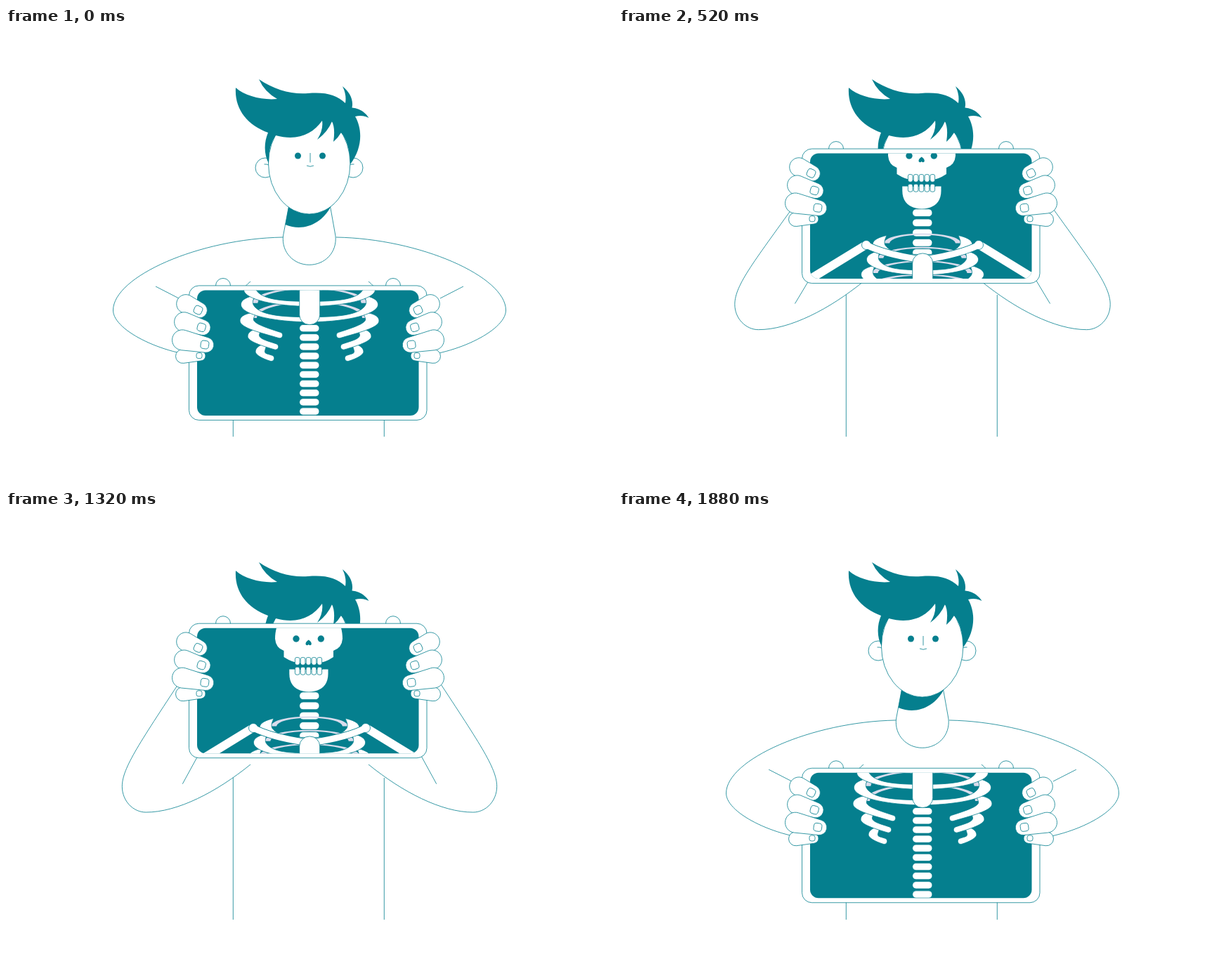
Recreate the animation shown at these times as an HTML page. Size 864 px wide and 648 px high, loop 1920 ms.

```html
<!DOCTYPE html>
<html lang="en">
<head>
<meta charset="utf-8">
<title>X-ray screen</title>
<style>
  html, body { margin: 0; width: 100%; height: 100%; overflow: hidden; background: #fff; }
  svg { display: block; width: 864px; height: 648px; }
  .line { fill: none; stroke: #057f8e; stroke-width: .8; }
  .shape { fill: #fff; stroke: #057f8e; stroke-width: .8; }
  .teal { fill: #057f8e; }
  .back { fill: #dadcec; }
  .bone { fill: none; stroke: #fff; stroke-linecap: round; }
  .rim { fill: none; stroke: #057f8e; stroke-linecap: round; }
</style>
</head>
<body>
<svg viewBox="0 0 864 648">
  <defs>
    <clipPath id="window"><rect id="hole" x="272" width="315.5" height="178.5" rx="12"/></clipPath>
  </defs>

  <!-- person -->
  <path class="line" d="M323.3 380V582M538.3 380V582"/>
  <path class="shape" d="M402.5 254L394.5 296C392 320 410 337.3 431.7 337.3S471.5 320 469 296L461.5 254Z"/>
  <path class="teal" d="M402.5 253L397.5 280C424 291 450 278 462.5 254Z"/>
  <circle class="shape" cx="369" cy="199" r="14"/>
  <circle class="shape" cx="494" cy="199" r="14"/>
  <path class="line" d="M367.5 194Q371 193.5 375 195.5M495.500 194Q492 193.5 488 195.5"/>
  <ellipse class="shape" cx="431.7" cy="193" rx="58.2" ry="72"/>
  <path class="teal" d="M327 85C340 97 365 103 386 101Q368 91 360 73C382 88 407 95 430 93
    C455 91 470 95 483 107Q485 95 479 83C489 91 495 102 492.5 113.5Q508 115 516.5 128
    Q507 123 497 126C508 145 507 172 490 194Q489 163 477 149Q473 156 466 162Q469 143 464 133
    Q458 148 443 159Q452 145 450 132C436 152 414 161 384 153Q373 168 374 193C367 180 367 163 373 149
    C343 138 325 115 327 85Z"/>
  <circle class="teal" cx="415.5" cy="182" r="4.5"/>
  <circle class="teal" cx="450.5" cy="182" r="4.5"/>
  <path class="line" d="M433 178V191.5M428 196Q433 198.5 438 196"/>

  <path id="arm" class="line"/>
  <use href="#arm" transform="matrix(-1 0 0 1 864 0)"/>

  <!-- screen -->
  <g class="slide">
    <circle class="shape" cx="309" cy="0" r="10.5"/>
    <circle class="shape" cx="551" cy="0" r="10.5"/>
    <rect class="shape" x="260.5" y="0" width="338.5" height="191.5" rx="14"/>
    <rect class="teal" x="272" y="6.5" width="315.5" height="178.5" rx="12"/>
  </g>

  <!-- skeleton, seen only through the screen -->
  <g clip-path="url(#window)">
    <g id="spine"></g>
    <g transform="translate(432)">
      <g id="half"></g>
      <use href="#half" transform="scale(-1 1)"/>
    </g>
    <rect class="shape" x="417.7" y="321" width="29" height="101.5" rx="14"/>
    <path fill="#fff" d="M400 139C388 152 383 168 383 182Q384 195 395.5 199V208Q408 216 418 216.5
      H444Q454 216 466 208V199Q478 195 479 182C479 168 474 152 462 139Z"/>
    <path fill="#fff" d="M403.3 225.5H458.5V232C458.5 249 447 257.5 431 257.5S403.3 249 403.3 232Z"/>
    <path class="teal" d="M411 219H450.5V226H411Z"/>
    <g id="teeth"></g>
    <circle class="teal" cx="413" cy="182" r="4.7"/>
    <circle class="teal" cx="448.3" cy="182" r="4.7"/>
    <path class="teal" d="M430.7 183.5C433 185 434.8 187 434.8 189C434.8 191.5 432 192 430.7 190
      C429.4 192 426.5 191.5 426.5 189C426.5 187 428.5 185 430.7 183.5Z"/>
  </g>

  <g class="slide">
    <g id="hand"></g>
    <use href="#hand" transform="matrix(-1 0 0 1 860 0)"/>
  </g>
</svg>

<script>
const $ = id => document.getElementById(id);
const LOOP = 1920, STEP = 40, LOW = 367, HIGH = 133;

const pill = (x, y, w, h, r) =>
  `<rect class="shape" x="${x}" y="${y}" width="${w}" height="${h}" rx="${r}"/>`;
const path = (cls, d) => `<path class="${cls}" d="${d}"/>`;
const times = (n, make) => Array.from({ length: n }, (_, i) => make(i)).join('');

// Rib rings widen and deepen towards the waist
const level = i => 308.5 + 21.3 * i;
const reach = i => 71 + 28 * Math.sin(i * Math.PI / 10);

// Left half of the front of a ring
function ring(i) {
  const y = level(i), R = reach(i), drop = 21 + i, low = y + drop, top = low - 7;
  return path('shape', `M0 ${low}C${-R * .5} ${low} ${-R} ${y + drop * .6} ${-R} ${y}
    C${-R} ${y - 7} ${-R + 10} ${y - 11} ${-R + 20} ${y - 13}
    C${-R + 17} ${y - 6} ${-R + 16} ${y - 3} ${-R + 18} ${y + 1}
    C${-R + 26} ${y + (drop - 7) * .8} ${-R * .45} ${top} 0 ${top}`);
}

// Left half of the far side: a crescent, thin at the spine
function backArc(i) {
  const y = level(i) - 2, r = reach(i) - 16, rise = 14 + 2 * i;
  return path('back', `M${-r} ${y}A${r} ${rise} 0 0 1 0 ${y - rise}v2
    A${r - 8} ${rise - 2} 0 0 0 ${8 - r} ${y}Z`);
}

// Short rib that ends in a round tip
function shortRib(i) {
  const x = 11 * i - 99, y = 417 + 22 * i, tx = -40 - 6 * i, ty = 437.5 + 16.4 * i;
  const w = tx - x, n = 8 + w * .16, bend = w * .12;
  return path('shape', `M${x} ${y}C${x} ${(y + ty) / 2} ${tx - 4 - w * .4} ${ty + 4 - bend} ${tx - 4} ${ty + 4}
    A4 4 0 0 0 ${tx - 1} ${ty - 4}C${tx - w * .4} ${ty - 4 - bend} ${x + n} ${y + 3} ${x + n + 2} ${y - 3}
    Q${x + n + 3} ${y - 9} ${x + n + 9} ${y - 12}C${x + 8} ${y - 12} ${x} ${y - 6} ${x} ${y}Z`);
}

// Capsule from a knuckle circle to a smaller fingertip circle, with a nail
function finger(x1, y1, r1, x2, y2, r2, nail, turn) {
  const d = Math.atan2(y2 - y1, x2 - x1);
  const a = Math.acos((r1 - r2) / Math.hypot(x2 - x1, y2 - y1));
  const at = (x, y, r, k) => `${x + r * Math.cos(k)} ${y + r * Math.sin(k)}`;
  return path('shape', `M${at(x1, y1, r1, d + a)}A${r1} ${r1} 0 1 1 ${at(x1, y1, r1, d - a)}
    L${at(x2, y2, r2, d - a)}A${r2} ${r2} 0 0 1 ${at(x2, y2, r2, d + a)}Z`) +
    `<g transform="translate(${x2 - 2} ${y2 - .3}) rotate(${turn})">` +
    pill(-nail / 2, -nail / 2, nail, nail, nail * .35) + '</g>';
}

const collar = 'M-80 309C-62 318 -40 324 -8 329';

$('half').innerHTML = times(6, backArc) +
  times(3, i => shortRib(2 - i)) +
  times(5, i => ring(4 - i)) +
  '<path class="bone" stroke-width="12" d="M-172 365L-84 311"/>' +
  `<path class="rim" stroke-width="10.6" d="${collar}"/>` +
  '<circle class="shape" cx="-80" cy="309" r="6.5"/>' +
  `<path class="bone" stroke-width="9" d="${collar}"/>`;

$('spine').innerHTML =
  times(5, i => pill(417.7, 257.8 + i * 14.2, 28.2, 10.8, 5.2)) +
  times(10, i => pill(417.7, 422.5 + i * 13.15, 28.2, 10.3, 5.1));

$('teeth').innerHTML = times(5, i => {
  const x = 411.4 + i * 7.9;
  return pill(x, 208.5, 6.6, 10.7, 2.4) + pill(x, 222.3, 6.6, 10.9, 2.4);
});

$('hand').innerHTML = finger(251.5, 100.5, 10, 277, 100, 7, 8, 0) +
  times(3, i => finger(256 - 2.5 * i, 26 + 25.7 * i, 13.3 + .6 * i,
    275.5 + 4.7 * i, 35 + 24.7 * i, 10.9, 11.5, 24 - 8 * i));

// Shoulder, elbow, armpit and crease of the left arm, by height of the screen
const poses = [
  { top: LOW, d: 'M394 298L394 298C275 300 152.5 354 152.5 402C152.5 432 230 468 290 468C335 468 300 400 348 361M213 368L246 385' },
  { top: 225, d: 'M394 298L262 296C205 340 162.5 365 162.5 400C162.5 418 179 432.3 195 432.3C240 432.3 300 400 348 361M247 409.5L265 396.5' },
  { top: HIGH, d: 'M394 298L255 200C185 325 166.5 366 166.5 389C166.5 411 182 427.7 201 427.7C246 427.7 300 400 348 361M253 380L279 324' }
];

function mix(a, b, s) {
  const number = /[\d.]+/g, goal = b.match(number);
  let i = 0;
  return a.replace(number, v => +v + (goal[i++] - v) * s);
}

function armPath(y) {
  const [a, b] = y > poses[1].top ? poses : poses.slice(1);
  return mix(a.d, b.d, (a.top - y) / (a.top - b.top));
}

// Lopsided S-curve: quick rise, long settle, mirrored on the way down
function screenTop(t) {
  const u = 1 - Math.abs(1 - ((t + 10) % LOOP) / (LOOP / 2));
  const go = 7.24 * u ** 2.25, stay = (1 - u) ** 1.2;
  return LOW + (HIGH - LOW) * go / (go + stay);
}

const sliders = document.querySelectorAll('.slide');

function draw(t) {
  const y = screenTop(t);
  sliders.forEach(g => g.setAttribute('transform', `translate(0 ${y})`));
  $('hole').setAttribute('y', y + 6.5);
  $('arm').setAttribute('d', armPath(y));
}

const start = performance.now();
function tick() {
  const t = (performance.now() - start) % LOOP;
  draw(Math.floor(t / STEP) * STEP);
  requestAnimationFrame(tick);
}
tick();
</script>
</body>
</html>
```
